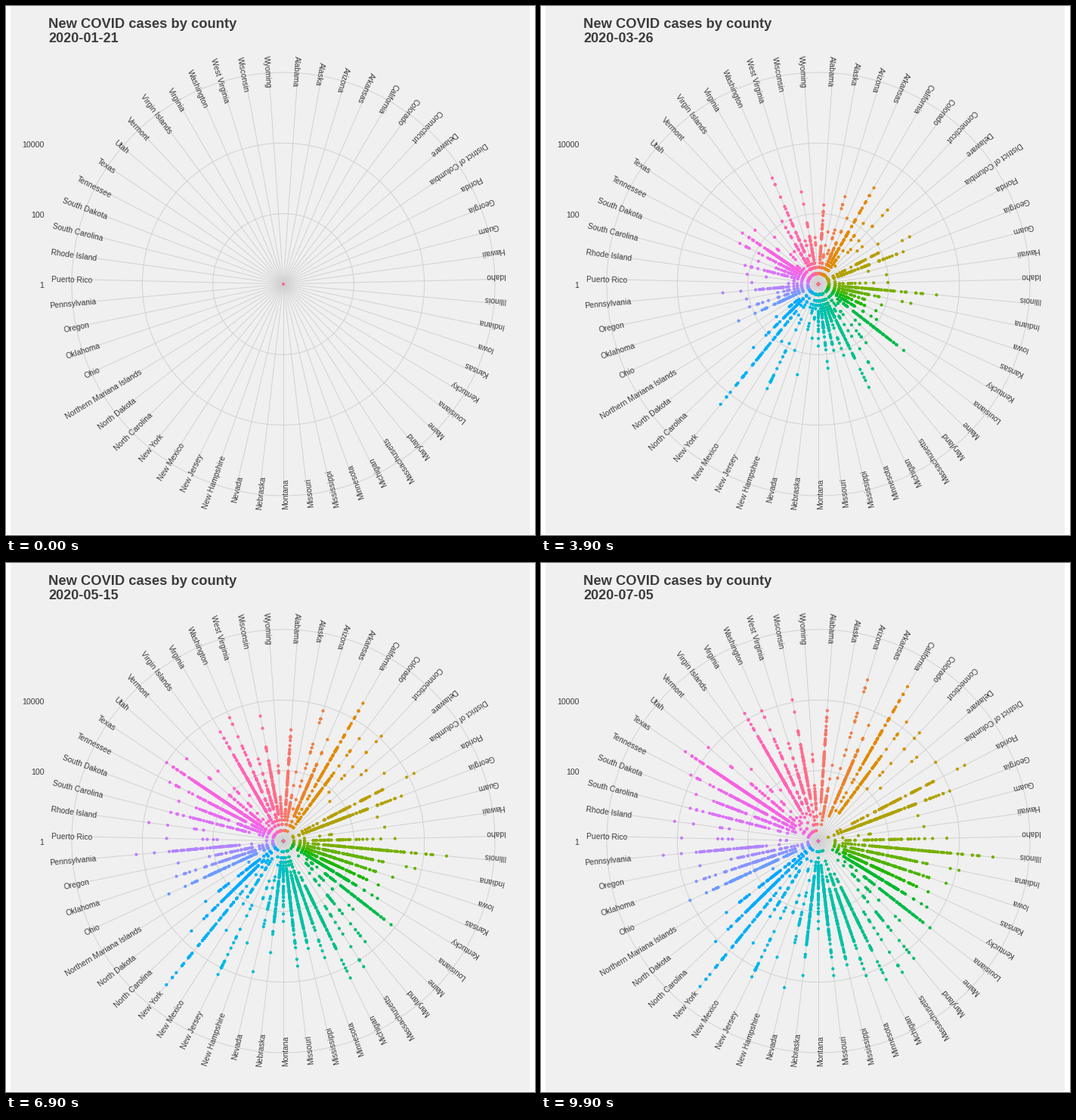
A matplotlib script that plays this animation: 700x700 px, repeating every 10000 ms.

```python
import numpy as np
import matplotlib.pyplot as plt
from matplotlib.animation import FuncAnimation

SIZE, DPI, FRAMES, LAST_DAY = 700, 100, 100, 166
CX, CY, DECADE, RIM = 367, 368, 46.65, 280
INK, GRID, PAPER = "#3c3c3c", "#d2d2d2", "#f0f0f0"
PX = 72 / DPI

STATES = """Alabama,Alaska,Arizona,Arkansas,California,Colorado,Connecticut,
Delaware,District of Columbia,Florida,Georgia,Guam,Hawaii,Idaho,Illinois,
Indiana,Iowa,Kansas,Kentucky,Louisiana,Maine,Maryland,Massachusetts,Michigan,
Minnesota,Mississippi,Missouri,Montana,Nebraska,Nevada,New Hampshire,
New Jersey,New Mexico,New York,North Carolina,North Dakota,
Northern Mariana Islands,Ohio,Oklahoma,Oregon,Pennsylvania,Puerto Rico,
Rhode Island,South Carolina,South Dakota,Tennessee,Texas,Utah,Vermont,
Virgin Islands,Virginia,Washington,West Virginia,Wisconsin,
Wyoming""".replace("\n", "").split(",")

COUNTIES = [67, 29, 15, 75, 58, 64, 8, 3, 1, 67, 159, 1, 5, 44, 102, 92, 99, 105,
            120, 64, 16, 24, 14, 83, 87, 82, 115, 56, 93, 17, 10, 21, 33, 58, 100,
            53, 1, 88, 77, 36, 67, 8, 5, 46, 66, 95, 254, 29, 14, 3, 133, 39, 55,
            72, 23]

# Radius of each state's worst county in late March and in early July.
MARCH = [105, 70, 121, 95, 147, 100, 134, 76, 95, 136, 120, 68, 91, 92, 157, 125,
         88, 84, 90, 143, 76, 100, 133, 152, 100, 90, 112, 82, 72, 123, 93, 154,
         90, 205, 120, 70, 14, 116, 96, 97, 127, 88, 95, 100, 85, 117, 121, 110,
         85, 53, 96, 153, 60, 124, 62]
JULY = [173, 102, 223, 167, 236, 196, 196, 171, 187, 218, 186, 136, 141, 170, 232,
        190, 178, 160, 168, 187, 150, 200, 206, 204, 189, 168, 179, 116, 179, 199,
        163, 200, 160, 248, 190, 154, 70, 187, 170, 160, 206, 181, 192, 175, 173,
        190, 212, 191, 130, 84, 195, 188, 135, 190, 115]

# First day and radius on day 43, for states hit before March.
EARLY = {"Washington": (0, 79), "California": (5, 60), "Illinois": (3, 33),
         "Arizona": (5, 14), "Massachusetts": (11, 22), "Texas": (22, 48),
         "Nebraska": (26, 52), "Oregon": (38, 14), "New York": (40, 58),
         "Florida": (40, 14), "Rhode Island": (40, 14)}
# Share of the spring growth reached by late April.
PACE = {"Arizona": .44, "Alabama": .5, "Wisconsin": .56, "Illinois": .73,
        "Indiana": .75, "Missouri": .75, "New York": .91, "Michigan": .94,
        "New Jersey": .9, "Connecticut": .87, "Massachusetts": .84,
        "Louisiana": .8, "Pennsylvania": .82, "Rhode Island": .83,
        "Vermont": .9, "Hawaii": .85, "Guam": .85}
# Typical gap below the worst county, as a share of its radius.
GAP = {"Alabama": .38, "Arizona": .28, "California": .42, "Connecticut": .2,
       "Delaware": .15, "Florida": .42, "Louisiana": .38, "Maryland": .28,
       "Massachusetts": .25, "Mississippi": .36, "New Jersey": .15,
       "New York": .42, "South Carolina": .34, "Rhode Island": .35}

DAYS = np.arange(LAST_DAY + 1)


def hue(i):
    """Evenly spaced hue with luminance 65 and chroma 100 in CIE LUV."""
    h, lum, chroma = np.radians(15 + 360 * i / len(STATES)), 65, 100
    u = chroma * np.cos(h) / (13 * lum) + 0.19784
    v = chroma * np.sin(h) / (13 * lum) + 0.46834
    y = ((lum + 16) / 116) ** 3
    xyz = [y * 9 * u / (4 * v), y, y * (12 - 3 * u - 20 * v) / (4 * v)]
    rgb = np.dot([[3.2405, -1.5371, -0.4985], [-0.9693, 1.8760, 0.0416],
                  [0.0556, -0.2040, 1.0572]], xyz)
    rgb = np.clip(rgb, 0, 1)
    return np.where(rgb > 0.0031308, 1.055 * rgb ** (1 / 2.4) - 0.055, 12.92 * rgb)


def worst_county(name, march, july):
    """Radius of the leading county for every day."""
    first, on43 = EARLY.get(name, (46, None))
    april = march + PACE.get(name, .62) * (july - march)
    x = (DAYS - 65) / 33
    spring = march + (april - march) * (1 - np.exp(-2 * x)) / (1 - np.exp(-2))
    summer = np.interp(DAYS, [98, LAST_DAY], [april, july])
    if on43 is None:
        start = np.interp(DAYS, [first, 65], [0, march])
    else:
        ramp = np.clip((DAYS - first) / (43 - first), 0, 1) ** 2 * on43
        start = np.where(DAYS < 43, ramp,
                         np.interp(DAYS, [43, 65], [on43, march]))
    r = np.where(DAYS < 65, start, np.where(DAYS < 98, spring, summer))
    return np.where(DAYS < first, -500, r)


def county_radii(name, count, march, july, rng):
    """Array of days x counties; NaN until the first case."""
    gap = july * np.clip(GAP.get(name, .5) + .19 * rng.normal(size=count), .05, .97)
    gap[0] = 0
    stretch = np.interp(DAYS, [43, 65], [1.5, 1])
    r = worst_county(name, march, july)[:, None] - gap * stretch[:, None]
    cases = np.where(r < 0, 0, np.round(10 ** (np.maximum(r, 0) / DECADE)))
    cases = np.maximum.accumulate(cases, axis=0)
    return np.where(cases > 0, DECADE * np.log10(np.maximum(cases, 1)), np.nan)


def theta(i):
    return 2 * np.pi * (i + 0.6) / (len(STATES) + 0.2)


def polar(angle, r):
    return CX + r * np.sin(angle), CY - r * np.cos(angle)


fig = plt.figure(figsize=(SIZE / DPI, SIZE / DPI), dpi=DPI, facecolor="white")
ax = fig.add_axes([0, 0, 1, 1])
ax.set(xlim=(0, SIZE), ylim=(SIZE, 0))
ax.axis("off")
ax.add_patch(plt.Rectangle((6, -2), 687, 701, color=PAPER, lw=0))


def write(x, y, text, px, **kw):
    return ax.text(x, y, text, fontsize=px * PX, color=INK,
                   family="Liberation Sans", va="baseline", **kw)


# Grid
for r in (2 * DECADE, 4 * DECADE, RIM):
    ax.add_patch(plt.Circle((CX, CY), r, fill=False, ec=GRID, lw=PX))
for i in range(len(STATES)):
    x, y = polar(theta(i), RIM)
    ax.plot([CX, x], [CY, y], color=GRID, lw=PX, zorder=1)

# Counties
rng = np.random.default_rng(21)
radii = np.hstack([county_radii(*row, rng)
                   for row in zip(STATES, COUNTIES, MARCH, JULY)])
owner = np.repeat(np.arange(len(STATES)), COUNTIES)
palette = np.array([hue(i) for i in range(len(STATES))])
dots = ax.scatter(np.full(owner.size, CX), np.full(owner.size, CY),
                  s=(4.2 * PX) ** 2, c=palette[owner], lw=0, zorder=2)

# Labels read toward the centre
for i, name in enumerate(STATES):
    a = theta(i)
    x, y = polar(a, RIM)
    write(x - 5.7 * np.cos(a), y - 2 - 5.7 * np.sin(a), name, 10.4, ha="center",
          rotation=270 - np.degrees(a), rotation_mode="anchor", zorder=3)
for text, y in (("10000", 187), ("100", 280), ("1", 373)):
    write(50.5, y, text, 10.6, ha="right")
write(56, 29, "New COVID cases by county", 18.4, weight="bold")
date = write(56, 48, "", 18, weight="bold")


def update(k):
    day = k * LAST_DAY // (FRAMES - 1)
    date.set_text(str(np.datetime64("2020-01-21") + day))
    dots.set_offsets(np.column_stack(polar(theta(owner), radii[day])))
    return dots, date


anim = FuncAnimation(fig, update, frames=FRAMES, interval=100, repeat=True,
                     repeat_delay=0)
plt.show()
```
